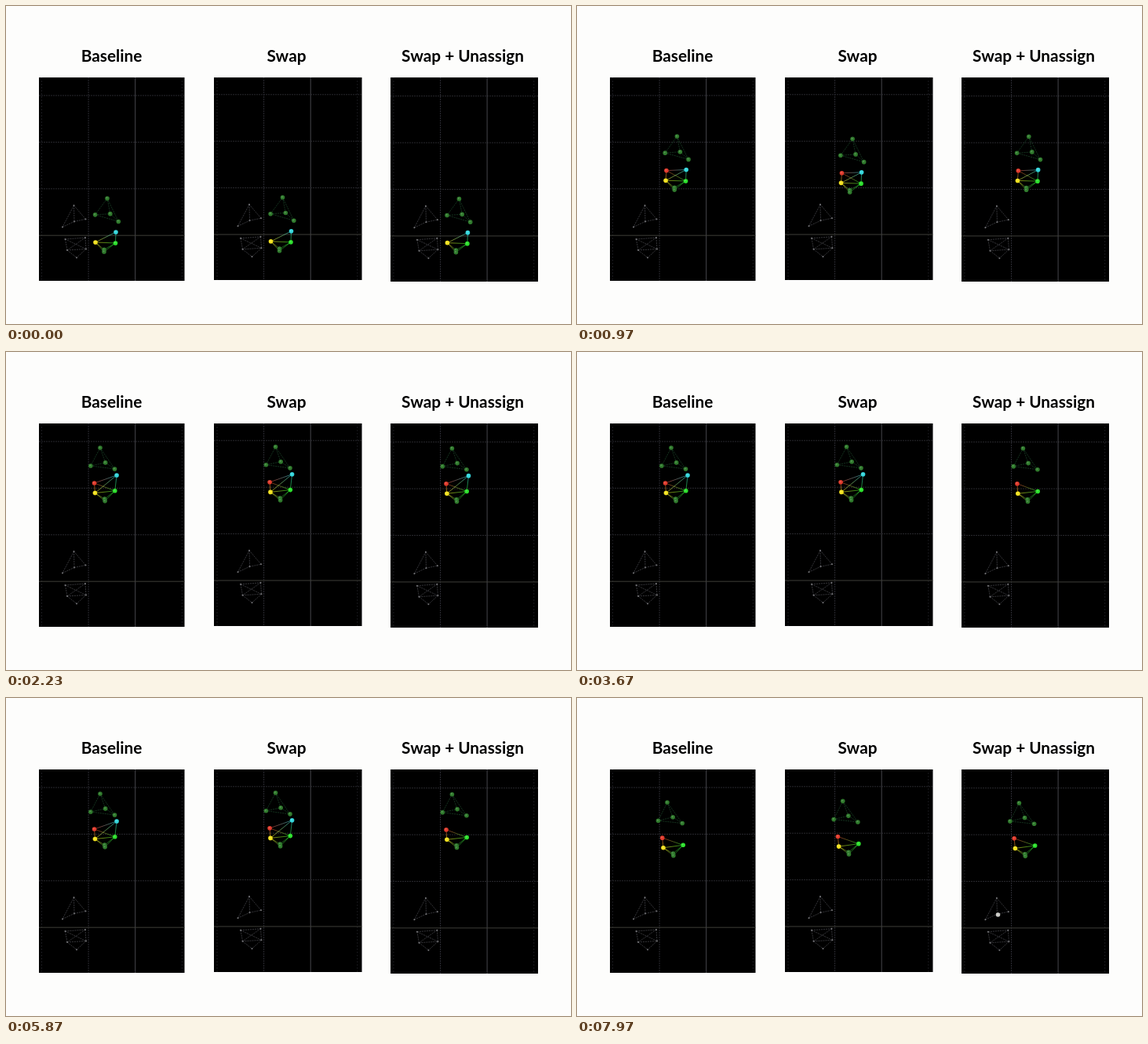
Animation, 720 px wide and 405 px high, one loop 8000 ms. Source, as an HTML page with a canvas:

```html
<!DOCTYPE html>
<html lang="en">
<head>
<meta charset="utf-8">
<title>Formation comparison</title>
<style>
  html, body { margin: 0; width: 100%; height: 100%; overflow: hidden; background: #fdfdfc; }
  canvas { display: block; width: 720px; height: 405px; }
</style>
</head>
<body>
<canvas id="stage"></canvas>
<script>
const LOOP = 8000;
const canvas = document.getElementById('stage');
const ctx = canvas.getContext('2d');
const dpr = window.devicePixelRatio || 1;
canvas.width = 720 * dpr;
canvas.height = 405 * dpr;

const DARK = '#2f7a2c', SPARE = '#c8c8c4', GHOST = '#4c4c52';

// Positions relative to the apex, which the whole formation turns around
const TEAM = {
  top:    { x: 0, y: 0, color: DARK },
  left:   { x: -15.4, y: 20.9, color: DARK },
  mid:    { x: 3.8, y: 19.7, color: DARK },
  right:  { x: 14.3, y: 29.5, color: DARK },
  red:    { x: -14, y: 43.4, color: '#e03a2c' },
  cyan:   { x: 11, y: 43, color: '#34d6dc' },
  yellow: { x: -15, y: 56, color: '#f2e11e' },
  green:  { x: 10.5, y: 57, color: '#2ce02c' },
  low:    { x: -4, y: 65.3, color: DARK },
  tail:   { x: -4, y: 68, color: DARK }
};

const pairs = list => list.flatMap((a, i) => list.slice(i + 1).map(b => [a, b]));
const UPPER = pairs(['top', 'left', 'mid', 'right']);
const LOWER = [
  ...pairs(['red', 'cyan', 'yellow', 'green']),
  ...['low', 'tail'].flatMap(n => [['yellow', n], ['green', n]])
];

// Flight of the apex: climb, hover, sink
const PATH = [
  { t: 0,    x: 129,   y: 245, turn: 0 },
  { t: 630,  x: 129,   y: 209, turn: 1 },
  { t: 1330, x: 124.5, y: 130, turn: -3.7 },
  { t: 2000, x: 120,   y: 122, turn: -8.5 },
  { t: 7250, x: 120,   y: 122, turn: -8.5 },
  { t: 7970, x: 115,   y: 133, turn: -10 }
];

const PANELS = [
  { title: 'Baseline', tx: 134.5, x: 42, w: 185.5, h: 259, dx: 0, dy: 0,
    delay: 0, sway: 0, fail: 7350, gone: 7800 },
  { title: 'Swap', tx: 357.5, x: 265, w: 188.5, h: 258, dx: 223.5, dy: -1.2,
    delay: 30, sway: 0, fail: 6900, gone: 7500 },
  { title: 'Swap + Unassign', tx: 582, x: 490, w: 188, h: 260, dx: 448.4, dy: 0.7,
    delay: 0, sway: -5.5, fail: 2300, gone: 2800, spare: 7650 }
];
const TOP = 91;

const GHOSTS = [
  { points: [[86.5, 254], [72, 281.5], [87, 274.5], [101.5, 271.5]], edges: '01 02 03 12 23' },
  { points: [[75.5, 297], [101, 295], [78, 311], [102, 309.5], [90, 320.5]],
    edges: '01 02 13 23 03 12 24 34' }
];

// Monotone cubic interpolation of one property of the path
function along(key, t) {
  const last = PATH.length - 1;
  if (t >= PATH[last].t) return PATH[last][key];
  let i = 0;
  while (t >= PATH[i + 1].t) i++;
  const slope = k => (PATH[k + 1][key] - PATH[k][key]) / (PATH[k + 1].t - PATH[k].t);
  const tangent = k => {
    if (k === 0) return slope(0);
    if (k === last) return slope(last - 1);
    const a = slope(k - 1), b = slope(k);
    return a * b <= 0 ? 0 : 2 * a * b / (a + b);
  };
  const h = PATH[i + 1].t - PATH[i].t, u = (t - PATH[i].t) / h, v = 1 - u;
  return v * v * (1 + 2 * u) * PATH[i][key] + u * u * (3 - 2 * u) * PATH[i + 1][key]
    + h * u * v * (v * tangent(i) - u * tangent(i + 1));
}

function line(a, b, color, width, dash = []) {
  ctx.strokeStyle = color;
  ctx.lineWidth = width;
  ctx.setLineDash(dash);
  ctx.beginPath();
  ctx.moveTo(a.x, a.y);
  ctx.lineTo(b.x, b.y);
  ctx.stroke();
}

function dot(x, y, r, color) {
  ctx.fillStyle = color;
  ctx.beginPath();
  ctx.arc(x, y, r, 0, Math.PI * 2);
  ctx.fill();
}

function node({ x, y }, color) {
  dot(x, y, 2.8, color);
  dot(x - 0.5, y - 0.6, 1, 'rgba(255,255,255,.2)');
}

function blend(a, b, from, to) {
  const g = ctx.createLinearGradient(a.x, a.y, b.x, b.y);
  g.addColorStop(0, from);
  g.addColorStop(1, to);
  return g;
}

// Cells of about 59.5 px; the third column line and the lowest row are the axes
function drawGrid(p) {
  const right = p.x + p.w, bottom = TOP + p.h;
  for (let i = 0; i < 4; i++) {
    const x = 45.5 + 59.6 * i + p.dx, y = 114 + 59.4 * i + p.dy;
    const edge = i % 3 === 0;
    line({ x, y: TOP }, { x, y: bottom },
      i === 2 ? '#45454a' : edge ? '#1a1a1e' : '#2b2b32', 1, i === 2 ? [] : [2, edge ? 2 : 1]);
    line({ x: p.x, y }, { x: right, y },
      i === 3 ? '#3e3e38' : '#29292e', 1, i === 3 ? [] : [2, 1]);
  }
}

function drawGhosts(p) {
  for (const { points, edges } of GHOSTS) {
    const at = points.map(([x, y]) => ({ x: x + p.dx, y: y + p.dy }));
    for (const [a, b] of edges.split(' ')) line(at[a], at[b], GHOST, 0.7, [2, 1]);
    for (const q of at) dot(q.x, q.y, 1, '#77777a');
  }
}

function pose(p, t) {
  const s = Math.max(0, t - p.delay);
  const turn = along('turn', s), angle = turn * Math.PI / 180;
  const cos = Math.cos(angle), sin = Math.sin(angle);
  const sway = t < 2000 ? p.sway * Math.sin(Math.PI * t / 1000) : 0;
  const x0 = along('x', s) + p.dx, y0 = along('y', s) + p.dy + sway;
  const at = {};
  for (const [name, { x, y }] of Object.entries(TEAM)) {
    at[name] = { x: x0 + x * cos - y * sin, y: y0 + x * sin + y * cos };
  }
  // The failing member drifts outwards as the team turns
  at.cyan.x -= turn * 0.45;
  at.cyan.y += turn * 0.7;
  return at;
}

function drawTeam(p, t) {
  const at = pose(p, t);
  const active = n => n === 'cyan' ? t < p.fail : n !== 'red' || t >= 300;
  for (const [a, b] of UPPER) line(at[a], at[b], '#1d4a2c', 0.7, [2, 1]);
  ctx.globalAlpha = 0.65;
  for (const [a, b] of LOWER) {
    if (active(a) && active(b)) {
      line(at[a], at[b], blend(at[a], at[b], TEAM[a].color, TEAM[b].color), 0.9);
    }
  }
  ctx.globalAlpha = 1;
  for (const name in TEAM) {
    if (active(name)) node(at[name], TEAM[name].color);
  }
  if (t >= p.fail && t < p.gone) node(at.cyan, SPARE);
  if (t >= p.spare) node({ x: 536.5, y: 276 }, SPARE);
}

function drawPanel(p, t) {
  ctx.fillStyle = '#000';
  ctx.font = 'bold 20.8px Lato, sans-serif';
  ctx.textAlign = 'center';
  ctx.fillText(p.title, p.tx, 71);
  ctx.fillRect(p.x, TOP, p.w, p.h);
  drawGrid(p);
  drawGhosts(p);
  drawTeam(p, t);
}

function frame() {
  const t = (performance.now() - start) % LOOP;
  ctx.setTransform(dpr, 0, 0, dpr, 0, 0);
  ctx.fillStyle = '#fdfdfc';
  ctx.fillRect(0, 0, 720, 405);
  for (const p of PANELS) drawPanel(p, t);
  requestAnimationFrame(frame);
}

const start = performance.now();
frame();
</script>
</body>
</html>
```
